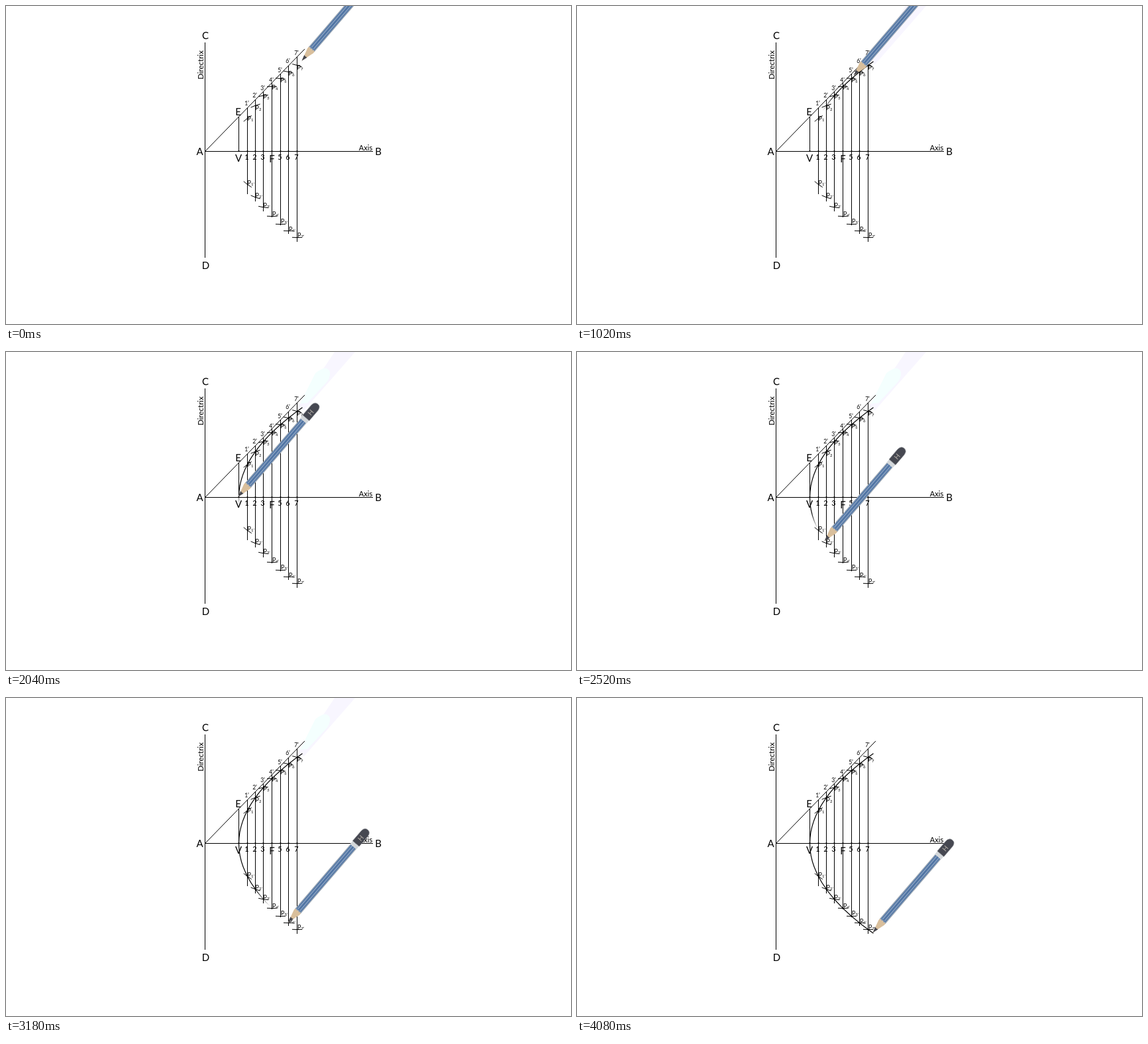
Recreate the animation shown at these times as an HTML page. Size 853 by 480 pixels, loop 4.14 s.

```html
<!DOCTYPE html>
<html lang="en">
<head>
<meta charset="utf-8">
<title>Drawing a parabola</title>
<style>
  html, body { margin: 0; width: 100%; height: 100%; overflow: hidden; background: #fff; }
  svg { display: block; }
  text { font-family: Lato, "Open Sans", sans-serif; fill: #000; }
  .line { stroke: #000; stroke-width: 1; fill: none; }
  .mid { text-anchor: middle; }
</style>
</head>
<body>
<svg width="853" height="480" viewBox="0 0 853 480">
  <defs>
    <linearGradient id="wipe" gradientUnits="userSpaceOnUse" x1="0" x2="0">
      <stop offset="0" stop-color="#000"/>
      <stop offset="1" stop-color="#000" stop-opacity="0"/>
    </linearGradient>
  </defs>
  <path id="trail" d="M496 0H527L450 88L440 84Z" fill="#f8f6ff"/>
  <path id="sheen" d="M467 32Q484 18 489 30Q490 40 482 48L455 77L444 78Z" fill="#f4fffe"/>
  <g id="figure"></g>
  <path id="curve" d="M447.5 83.7Q255.5 219.5 447.5 355.3" fill="none" stroke="url(#wipe)" stroke-width="1.2"/>
  <g id="pencil">
    <path d="M0 0L20 -5.7L24 -5.7V5.7L20 5.7Z" fill="#d9bf9c"/>
    <path d="M0 0L9 -2.8Q8 0 9 2.8Z" fill="#45464e"/>
    <path d="M22 -5.8H151V5.8H22Q25 4 22 2Q25 0 22 -2Q25 -4 22 -5.8Z" fill="#a3adb8"/>
    <path d="M23 -4.6H151V4.6H23Q26 3.3 23 2Q26 0 23 -2Q26 -3.3 23 -4.6Z" fill="#5b7da9"/>
    <path d="M25 -2H151M25 2H151" stroke="#a9bad0" stroke-width=".9"/>
    <path d="M25 0H151" stroke="#5276a5" stroke-width="2.2"/>
    <rect x="151" y="-6.2" width="6" height="12.4" fill="#d3d7da"/>
    <path d="M157 -6.5H177Q184.500 -6 184.500 0T177 6.500H157Z" fill="#464851" stroke="#8c8f94" stroke-width=".6"/>
    <text class="mid" x="168" y="3.600" font-size="10" style="fill:#b9b3aa">H</text>
  </g>
</svg>
<script>
const $ = id => document.getElementById(id);
const axisY = 219.5, focusX = 401.5, vertexX = 351.5, latus = 192;
const columns = [364.5, 376.5, 388.5, 401.5, 414.5, 426.5, 439.5];
const bottoms = [284, 295, 310, 319, 331, 344, 356];
const primeY = [150, 138, 127, 115, 100, 86, 74];
const upperY = [173, 157, 140, 126, 115, 105, 96];
const lowerY = [270, 289, 304, 317, 328, 340, 349];

let art = '';
const line = (x1, y1, x2, y2) => art += `<path class="line" d="M${x1} ${y1}L${x2} ${y2}"/>`;
const text = (x, y, size, str, cls = 'mid', more = '') =>
  art += `<text class="${cls}" x="${x}" y="${y}" font-size="${size}" ${more}>${str}</text>`;
const point = (x, y, sub) =>
  text(x, y, 9, `P<tspan font-size="6" dy="1">${sub}</tspan>`, '');
const slopeY = x => axisY - (x - 300.5) * 1.027;

// Short compass arc through the curve at x; below the axis (side 1) it lies flat past the focus
function arc(x, side) {
  const dx = side > 0 ? Math.min(0, x - focusX) : x - focusX;
  const dy = side * Math.sqrt(latus * (x - vertexX));
  const r = Math.hypot(dx, dy), a = Math.atan2(dy, dx), half = 7.5 / r;
  const at = b => `${x - dx + r * Math.cos(b)} ${axisY + r * Math.sin(b)}`;
  art += `<path class="line" d="M${at(a - half)}A${r} ${r} 0 0 1 ${at(a + half)}"/>`;
}

line(300.5, 55, 300.5, 380);
line(300, axisY, 554, axisY);
line(300.5, axisY, 451, slopeY(451));
line(vertexX, slopeY(vertexX), vertexX, axisY);

columns.forEach((x, i) => {
  const n = i + 1;
  line(x, slopeY(x), x, bottoms[i]);
  arc(x, -1);
  arc(x, 1);
  text(x - 1, primeY[i], 8.5, n + '’');
  if (n !== 4) text(x - 1, 232, 11, n);
  point(x, upperY[i], n);
  point(x + (i > 2 ? .5 : 0), lowerY[i], n + '’');
});
[vertexX, ...columns].forEach(x => art += `<circle cx="${x}" cy="219" r="1.1"/>`);

[['C', 301, 50], ['D', 301.5, 397], ['A', 292.5, 225], ['B', 562, 225],
 ['E', 350.5, 165], ['V', 351, 235], ['F', 401.5, 236]]
  .forEach(([s, x, y]) => text(x, y, 15, s));
text(543, 218, 11, 'Axis');
text(0, 0, 11.5, 'Directrix', 'mid', 'transform="translate(298 89) rotate(-90)"');
$('figure').innerHTML = art;

const curve = $('curve'), wipe = $('wipe'), length = curve.getTotalLength();
const ease = p => (1 - Math.cos(Math.PI * p)) / 2;

function draw(now) {
  const t = Math.floor(now % 4140 / 60) * 60;
  const p = Math.min(1, Math.max(0, (t - 280) / 3520));
  const tip = curve.getPointAtLength(length * ease(p));
  $('pencil').setAttribute('transform', `translate(${tip.x - 1} ${tip.y - 1}) rotate(-49.3)`);

  const lead = 85 + .072 * t;
  wipe.setAttribute('y1', lead - 24);
  wipe.setAttribute('y2', lead);

  $('trail').style.display = t >= 600 && t < 3840 ? '' : 'none';
  $('sheen').style.display = t >= 1680 && t < 3840 ? '' : 'none';
}

const start = performance.now();
function tick() {
  draw(performance.now() - start);
  requestAnimationFrame(tick);
}
tick();
</script>
</body>
</html>
```
